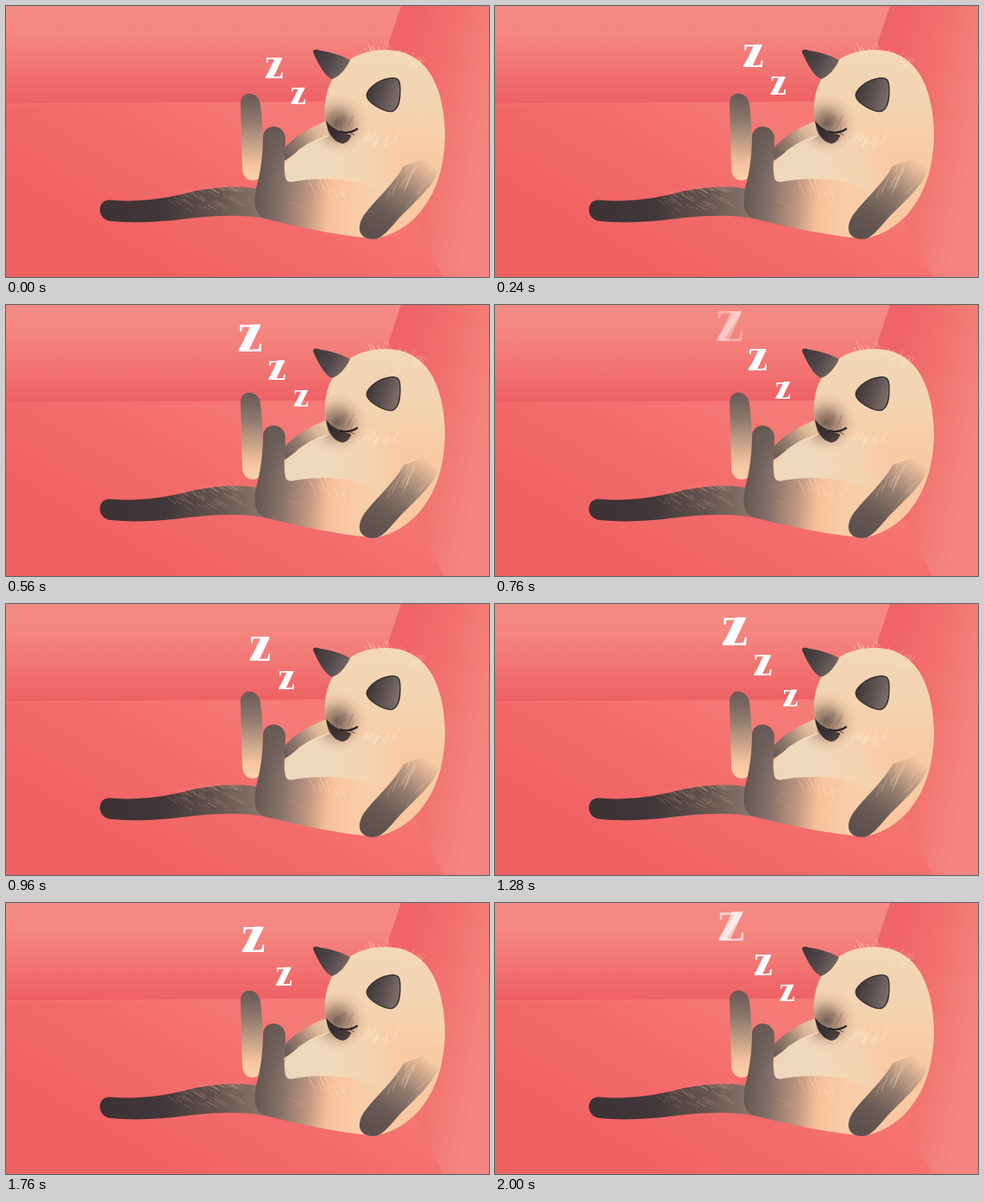
An HTML page with a canvas that plays this animation: 560 px wide and 315 px high, repeating every 2040 ms.

```html
<!DOCTYPE html>
<html lang="en">
<head>
<meta charset="utf-8">
<title>Sleeping cat</title>
<style>
html, body { margin: 0; width: 100%; height: 100%; overflow: hidden; background: #f26868; }
canvas { display: block; }
</style>
</head>
<body>
<canvas id="stage" width="560" height="315"></canvas>
<script>
const W = 560, H = 315, LOOP = 2040, STEP = 40;
const ctx = document.getElementById('stage').getContext('2d');
const scene = document.createElement('canvas');
scene.width = W;
scene.height = H;
const g = scene.getContext('2d');

let seed = 7;
function rand() {
  seed = (seed * 16807) % 2147483647;
  return seed / 2147483647;
}

function addStops(grad, colors) {
  colors.forEach((c, i) => {
    const [color, at] = Array.isArray(c) ? c : [c, i / (colors.length - 1)];
    grad.addColorStop(at, color);
  });
  return grad;
}
const linear = (x0, y0, x1, y1, ...colors) =>
  addStops(g.createLinearGradient(x0, y0, x1, y1), colors);
const radial = (x, y, r, ...colors) =>
  addStops(g.createRadialGradient(x, y, 0, x, y, r), colors);

function shape(d, fill) {
  const path = new Path2D(d);
  g.fillStyle = fill;
  g.fill(path);
  return path;
}

function line(d, color, width) {
  g.strokeStyle = color;
  g.lineWidth = width;
  g.lineCap = 'round';
  g.stroke(new Path2D(d));
}

// Hairs scattered along a segment, all leaning by (dx, dy).
function fur(x0, y0, x1, y1, spread, dx, dy, count, color) {
  for (let i = 0; i < count; i++) {
    const k = (i + rand()) / count;
    const x = x0 + (x1 - x0) * k + (rand() - 0.5) * spread;
    const y = y0 + (y1 - y0) * k + (rand() - 0.5) * spread;
    const s = 0.6 + rand() * 0.6, bend = (rand() - 0.5) * 4;
    line(`M${x} ${y} q${dx * s / 2 + bend} ${dy * s / 2} ${dx * s} ${dy * s}`, color, 0.6);
  }
}

function drawRoom() {
  shape('M0 0H560V315H0Z', linear(300, 110, 180, 315, '#f67b77', '#f36b6b', '#f06262'));
  shape('M0 0H470L440 111L0 114Z',
    linear(0, 0, 0, 113, '#f58b84', ['#f58781', 0.25], ['#f27472', 0.65], '#ee6064'));
  line('M0 114L400 111', 'rgba(250,140,132,.55)', 0.8);
  shape('M458 0L440 54L450 200L474 247L507 315H560V0Z',
    linear(455, 100, 562, 120, '#f06366', '#f27370', '#f5857e'));
}

function drawTail() {
  shape('M120 225.5C150 228 178 225 205 218.5C235 211 270 207 298 214L304 248' +
    'C270 240 225 245 195 249C165 252 140 252 121 250C105 248 105 225.5 120 225.5Z',
    linear(110, 0, 304, 0, '#3d3234', ['#41373a', 0.38], ['#62524e', 0.68], '#8f7a70'));
  fur(196, 229, 240, 217, 12, -9, -6, 20, 'rgba(222,180,145,.4)');
  fur(212, 235, 278, 226, 13, -11, -6, 24, 'rgba(225,184,150,.35)');
  fur(242, 216, 276, 215, 5, -9, -5, 12, 'rgba(238,196,160,.5)');
}

function drawBody() {
  // far leg
  shape('M272 115C270 98 292 97 295 114C298 139 298 165 298 190C297 207 275 207 274 190Z',
    linear(0, 102, 0, 204, '#685955', ['#8d786c', 0.3], ['#c29d84', 0.55],
      ['#f6c6a0', 0.82], '#fad2ac'));

  // head, back and belly in one silhouette
  const body = shape('M375 151C366 125 367 90 392 68C404 56 421 51 441 51' +
    'C467 51 485 65 495 84C505 103 509 128 509 152C508 187 499 217 480 240' +
    'C466 256 448 267 428 270.5C385 267 335 256 305 245L322 175Z',
    linear(0, 52, 0, 250, '#f3d7b6', ['#f4d3b0', 0.35], ['#f9cba5', 0.6], '#fbc8a0'));

  // far arm
  shape('M374 133C355 139 334 152 323 165L323 180C340 168 358 154 377 150Z',
    linear(323, 172, 372, 140, '#6c5d58', ['#957d6e', 0.35], ['#dcb798', 0.75], '#eac6a4'));

  // belly
  shape('M323 186C334 168 354 155 375 150C390 164 413 151 432 152' +
    'C450 158 463 174 461 187C458 202 444 212 432 221L324 207Z',
    linear(330, 190, 460, 180, '#eed8bc', '#f1d9bb', ['#f5d2b0', 0.75], '#fac9a2'));

  // near leg and thigh
  shape('M298 153C298 136 322 136 324 153C324 170 321 185 324 200Q326 206 334 204' +
    'C360 199 395 200 417 208C428 212 434 217 437 222L428 270' +
    'C385 267 335 256 304 248C287 245 287 229 290 212C295 195 298 172 298 153Z',
    linear(292, 208, 432, 222, '#655752', ['#85716a', 0.2], ['#c09780', 0.43],
      ['#f8c09a', 0.6], ['#f9cba6', 0.8], '#f7d0ab'));
  shape('M298 153C298 136 322 136 324 153C324 170 321 185 324 200L294 200' +
    'C297 182 298 168 298 153Z',
    linear(0, 139, 0, 200, 'rgba(100,87,83,.95)', 'rgba(110,94,87,0)'));
  fur(360, 212, 402, 224, 17, -5, -13, 20, 'rgba(255,231,204,.5)');
  fur(325, 208, 350, 246, 22, -8, -3, 9, 'rgba(220,182,153,.25)');

  // near arm
  shape('M461 186C450 207 429 224 415 243C405 259 410 271 426 271' +
    'C437 271 445 258 459 243C476 226 494 211 503 190L506 170Z',
    linear(423, 264, 487, 178, '#5c504e', ['#6a5b56', 0.28], ['#947c6d', 0.58],
      ['#d3ab8e', 0.84], '#f9cba5'));
  fur(449, 219, 474, 193, 14, 6, -13, 22, 'rgba(246,210,174,.5)');
  fur(463, 231, 490, 203, 14, 8, -11, 16, 'rgba(246,208,171,.35)');
  fur(407, 163, 444, 161, 14, 5, -11, 24, 'rgba(255,240,218,.65)');
  fur(340, 169, 372, 151, 5, -6, 3, 12, 'rgba(244,217,186,.6)');
  fur(420, 57, 448, 54, 9, -5, -8, 12, 'rgba(255,232,205,.7)');
  fur(449, 60, 482, 72, 13, 9, -9, 15, 'rgba(255,230,202,.65)');
  return body;
}

function drawFace(body) {
  g.save();
  g.clip(body);
  g.fillStyle = radial(384, 137, 38, 'rgba(105,84,77,.9)', ['rgba(146,117,101,.72)', 0.35],
    ['rgba(205,168,141,.4)', 0.68], 'rgba(244,210,175,0)');
  g.fillRect(345, 98, 80, 78);
  g.restore();
  fur(380, 138, 399, 141, 8, 5, -12, 9, 'rgba(80,62,58,.35)');
  shape('M371 133C375 139 382 144 389 146C394 149 398 149 400 150' +
    'C399 155 396 159 390 160C379 158 373 147 371 133Z',
    linear(374, 138, 397, 158, '#302a2d', '#3b3132', '#51443f'));
  line('M388 146Q398 149 407 143', '#292426', 2.2);
  line('M395 149L400 152M400 148L404 150', '#3a2f2f', 0.8);

  // ears
  shape('M357 56C354 50 359 50 365 52C378 54 391 58 399 63C394 73 387 82 378 85' +
    'C370 82 362 67 357 56Z', linear(359, 53, 395, 72, '#403739', '#50464a', '#756661'));
  const ear = shape('M419 107C415 100 429 86 445 84C455 82 457 87 457 97' +
    'C457 108 456 118 449 122C442 125 423 115 419 107Z',
    linear(421, 97, 457, 107, '#40383a', '#5c5150', '#80716c'));
  g.strokeStyle = '#373033';
  g.lineWidth = 1.4;
  g.stroke(ear);
}

drawRoom();
drawTail();
drawFace(drawBody());

// Times at which each letter passes the middle of its path.
const passes = [0, 625, 1270, 2000, 2625];
const LIFE = 800, FADE_IN = 80, FADE_OUT = 120;

// A serif Z with a heavy diagonal.
function fatZ(x, y, h) {
  ctx.font = `bold ${h * 1.46}px "Liberation Serif", "Times New Roman", serif`;
  ctx.fillText('Z', x, y + h / 2);
  ctx.beginPath();
  ctx.moveTo(x + h * 0.04, y - h * 0.47);
  ctx.lineTo(x + h * 0.4, y - h * 0.47);
  ctx.lineTo(x - h * 0.04, y + h * 0.47);
  ctx.lineTo(x - h * 0.4, y + h * 0.47);
  ctx.fill();
}

function drawLetter(age) {
  if (Math.abs(age) >= LIFE) return;
  const sq = age * age;
  const x = 311 - 0.0473 * age - 5e-6 * sq;
  const y = 71.5 - 0.0567 * age - 7e-6 * sq;
  const h = 24 + 0.0105 * age + 6.5e-6 * sq;
  const fade = Math.min((LIFE + age) / FADE_IN, (LIFE - age) / FADE_OUT);
  ctx.fillStyle = `rgba(255,255,255,${Math.min(1, fade)})`;
  fatZ(x, y, h);
}

function draw(now) {
  const t = Math.floor((now % LOOP) / STEP) * STEP;
  ctx.drawImage(scene, 0, 0);
  ctx.textAlign = 'center';
  ctx.textBaseline = 'alphabetic';
  for (const p of passes) drawLetter(t - p);
}

const start = performance.now();
function tick() {
  draw(performance.now() - start);
  requestAnimationFrame(tick);
}
tick();
</script>
</body>
</html>
```
